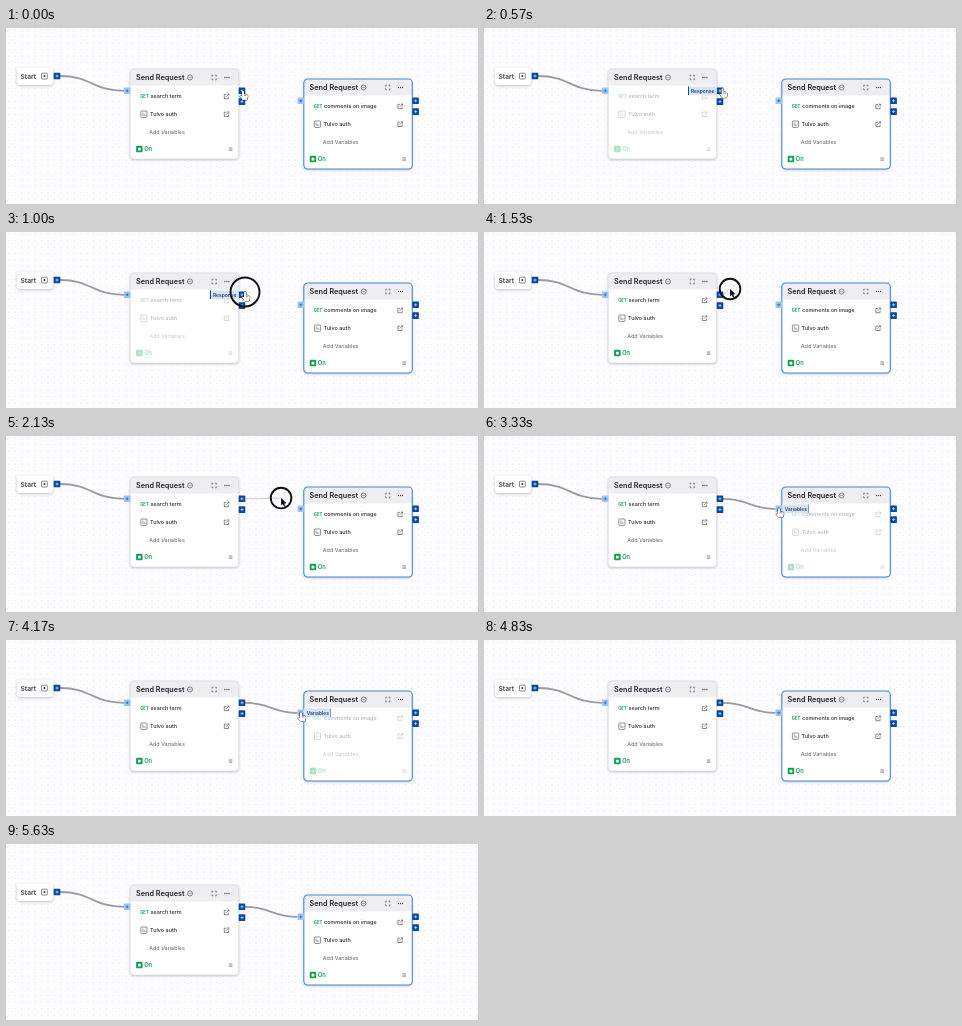
An HTML page with a canvas for the animation above (5.71 s loop, 472x176 px).

```html
<!DOCTYPE html>
<html lang="en">
<head>
<meta charset="utf-8">
<title>Connecting two request blocks</title>
<style>
html, body { margin: 0; width: 100%; height: 100%; overflow: hidden; background: #fdfcfe; }
canvas { display: block; width: 472px; height: 176px; }
</style>
</head>
<body>
<canvas id="stage"></canvas>
<script>
const W = 472, H = 176, LOOP = 5710;
const canvas = document.getElementById('stage');
const ctx = canvas.getContext('2d');
const dpr = window.devicePixelRatio || 1;
canvas.width = W * dpr;
canvas.height = H * dpr;

const NAVY = '#0b47a0', GREEN = '#12a150', INK = '#2b2c30', WIRE = '#9b9b9d';

// Pointer path: time, x, y
const PATH = [
  [0, 237, 63], [300, 237.6, 62.4], [700, 239, 60], [1100, 239, 60],
  [1290, 242.5, 56], [1530, 246, 57], [1800, 257, 58.5], [2130, 275, 62],
  [2430, 294, 72], [2700, 295, 72.5], [4230, 295, 72.5], [4680, 326, 7]
];

const clamp = v => Math.max(0, Math.min(1, v));
const ramp = (t, a, b) => clamp((t - a) / (b - a));
const smooth = v => v * v * (3 - 2 * v);
const pulse = (t, a, b, c, d) => smooth(ramp(t, a, b)) * (1 - smooth(ramp(t, c, d)));

function pointerAt(t) {
  for (let i = 1; i < PATH.length; i++) {
    const [a, ax, ay] = PATH[i - 1], [b, bx, by] = PATH[i];
    if (t <= b) {
      const k = ramp(t, a, b);
      return [ax + (bx - ax) * k, ay + (by - ay) * k];
    }
  }
  return PATH[PATH.length - 1].slice(1);
}

function text(str, x, y, size, weight, color) {
  ctx.font = `${weight} ${size}px Inter, "Liberation Sans", sans-serif`;
  ctx.fillStyle = color;
  ctx.fillText(str, x, y + size * 0.364);
}

function box(x, y, w, h, r, fill, stroke, lw = 1) {
  ctx.beginPath();
  ctx.roundRect(x, y, w, h, r);
  if (fill) { ctx.fillStyle = fill; ctx.fill(); }
  if (stroke) { ctx.strokeStyle = stroke; ctx.lineWidth = lw; ctx.stroke(); }
}

function line(points, color, lw) {
  ctx.beginPath();
  points.forEach(([x, y], i) => i ? ctx.lineTo(x, y) : ctx.moveTo(x, y));
  ctx.strokeStyle = color;
  ctx.lineWidth = lw;
  ctx.stroke();
}

function dot(x, y, r, color) {
  ctx.beginPath();
  ctx.arc(x, y, r, 0, Math.PI * 2);
  ctx.fillStyle = color;
  ctx.fill();
}

function ring(x, y, r, color, lw) {
  ctx.beginPath();
  ctx.arc(x, y, r, 0, Math.PI * 2);
  ctx.strokeStyle = color;
  ctx.lineWidth = lw;
  ctx.stroke();
}

function wire(x1, y1, x2, y2, color, lw) {
  const mid = (x1 + x2) / 2;
  ctx.beginPath();
  ctx.moveTo(x1, y1);
  ctx.bezierCurveTo(mid, y1, mid, y2, x2, y2);
  ctx.strokeStyle = color;
  ctx.lineWidth = lw;
  ctx.stroke();
}

function port(x, y, input) {
  box(x - 3.3, y - 3.3, 6.6, 6.6, 0.6, input ? '#9cc5f5' : NAVY);
  const c = input ? '#2a62b0' : '#c4dafa';
  line([[x - 1.5, y], [x + 1.5, y]], c, 0.8);
  line([[x, y - 1.5], [x, y + 1.5]], c, 0.8);
}

function shadowed(draw) {
  ctx.save();
  ctx.shadowColor = 'rgba(40,40,55,.28)';
  ctx.shadowBlur = 3 * dpr;
  ctx.shadowOffsetY = dpr;
  draw();
  ctx.restore();
}

function linkIcon(x, y) {
  const c = '#55565c';
  line([[x, y - 2], [x - 2.2, y - 2], [x - 2.2, y + 2.3], [x + 2, y + 2.3], [x + 2, y + 0.3]], c, 0.7);
  line([[x - 0.4, y + 0.4], [x + 2.3, y - 2.3]], c, 0.7);
  line([[x + 0.8, y - 2.4], [x + 2.4, y - 2.4], [x + 2.4, y - 0.8]], c, 0.7);
}

function expandIcon(x, y) {
  for (const sx of [-1, 1]) for (const sy of [-1, 1]) {
    line([[x + sx * 0.9, y + sy * 2.3], [x + sx * 2.1, y + sy * 2.3], [x + sx * 2.1, y + sy * 0.9]], '#55565c', 0.75);
  }
}

function card(x, y, label, selected, fade) {
  ctx.save();
  ctx.translate(x, y);
  shadowed(() => box(0, 0, 108.5, 90, 4, '#fff'));
  box(0, 0, 108.5, 16.5, [4, 4, 0, 0], '#eeedf0');
  box(0, 0, 108.5, 90, 4, null, selected ? '#4589d9' : '#d9d8dc', selected ? 1.1 : 0.6);

  text('Send Request', 5.8, 8.5, 7.25, 600, '#222328');
  ring(59.8, 8.5, 2.5, '#55565c', 0.7);
  for (let i = -1; i < 2; i++) {
    dot(59.8 + i * 1.1, 8.5, 0.4, '#55565c');
    dot(96.7 + i * 2, 8.5, 0.65, '#45464b');
  }
  expandIcon(84, 8.5);

  ctx.globalAlpha = 1 - 0.66 * fade;
  text('GET', 10, 27.4, 4.2, 700, GREEN);
  text(label, 20.3, 27.4, 5.45, 500, INK);
  linkIcon(96.3, 27.4);
  box(10.6, 42, 6.2, 6.4, 0.8, null, '#55565c', 0.65);
  line([[12, 44.2], [13.3, 44.2]], '#55565c', 0.7);
  line([[12, 46], [15.4, 46]], '#55565c', 0.7);
  text('Tulvo auth', 19.8, 45.2, 5.45, 500, INK);
  linkIcon(96.3, 45.2);
  text('Add Variables', 19, 62.8, 5.45, 400, '#606167');
  box(5.9, 76.8, 6.5, 6.5, 1, GREEN);
  box(7.8, 78.7, 2.7, 2.7, 0.3, '#fff');
  text('On', 14, 80.1, 5.7, 600, GREEN);
  for (let i = -1; i < 2; i++) line([[98.6, 80.1 + i * 1.3], [102.2, 80.1 + i * 1.3]], '#77787d', 0.65);
  ctx.restore();

  port(x - 3, y + 21.8, true);
  port(x + 111.8, y + 21.8);
  port(x + 111.8, y + 32.6);
}

function startNode() {
  shadowed(() => box(11, 39.5, 36, 17.5, 3, '#fff'));
  text('Start', 14.5, 48.2, 6.6, 600, '#3b3c42');
  box(35.5, 45.2, 5.8, 5.8, 0.8, null, '#55565c', 0.7);
  dot(38.4, 48.1, 1, '#33343a');
  port(51, 48);
}

function tag(str, x, y, w, barRight, alpha) {
  if (!alpha) return;
  ctx.save();
  ctx.globalAlpha = alpha;
  box(x, y - 4.3, w, 8.6, 0.6, '#d3e4fa');
  box(barRight ? x + w - 1 : x, y - 4.3, 1, 8.6, 0, barRight ? '#6f9fdd' : NAVY);
  text(str, x + 2.9, y, 5, 500, '#1d3153');
  ctx.restore();
}

const HAND = new Path2D('M-1 .2Q0 -1 1 .2L1 3L3.8 3.6Q5 4 4.8 5.5L4 9L-.2 9L-3 5.6Q-3 4.3 -1 5.3Z');
const ARROW = new Path2D('M0 0L0 7.5L1.8 5.9L3.2 8.8L4.5 8.2L3.2 5.4L5.5 5.2Z');

function pointer(x, y, hand) {
  ctx.save();
  ctx.translate(x, y);
  ctx.lineJoin = 'round';
  ctx.lineWidth = hand ? 0.9 : 1.2;
  ctx.strokeStyle = hand ? '#111' : '#fff';
  ctx.fillStyle = hand ? '#fff' : '#111';
  const shape = hand ? HAND : ARROW;
  ctx.stroke(shape);
  ctx.fill(shape);
  if (hand) {
    line([[1.2, 3.4], [1.2, 5]], '#111', 0.5);
    line([[2.8, 3.7], [2.8, 5]], '#111', 0.5);
  }
  ctx.restore();
}

function background() {
  ctx.fillStyle = '#fdfcfe';
  ctx.fillRect(0, 0, W, H);
  for (let y = 2; y < H; y += 6.5) {
    for (let x = 3; x < W; x += 6.5) dot(x, y, 0.5, '#e3e0e8');
  }
}

function draw(t) {
  ctx.setTransform(dpr, 0, 0, dpr, 0, 0);
  const [px, py] = pointerAt(t);
  const hoverOut = pulse(t, 90, 260, 1060, 1200);
  const hoverIn = pulse(t, 2480, 2650, 4270, 4430);

  background();
  wire(54, 48, 118, 62.8, WIRE, 1.8);
  if (t >= 3030) wire(239, 62.8, 291.5, 72.8, WIRE, 1.8);
  else if (t > 1180) wire(239, 62.8, px, py, '#bdbdc0', 0.8);

  startNode();
  card(124.2, 41, 'search term', false, hoverOut);
  card(297.8, 51, 'comments on image', true, hoverIn);
  tag('Response', 204, 62.8, 28.7, false, hoverOut);
  tag('Variables', 297.8, 72.8, 27.2, true, hoverIn);

  if (t < 4700) pointer(px, py, t < 1180 || (t > 2480 && t < 4280));

  if (t >= 930 && t < 3200) {
    const grow = smooth(ramp(t, 3030, 3200));
    const r = 10.3 + 4.2 * (1 - smooth(ramp(t, 1000, 1170))) + 4.2 * grow;
    ctx.globalAlpha = 1 - grow;
    ring(px, py, r, '#111', 1.9);
    ctx.globalAlpha = 1;
  }
}

const begin = performance.now();
function tick() {
  draw((performance.now() - begin) % LOOP);
  requestAnimationFrame(tick);
}
tick();
</script>
</body>
</html>
```
